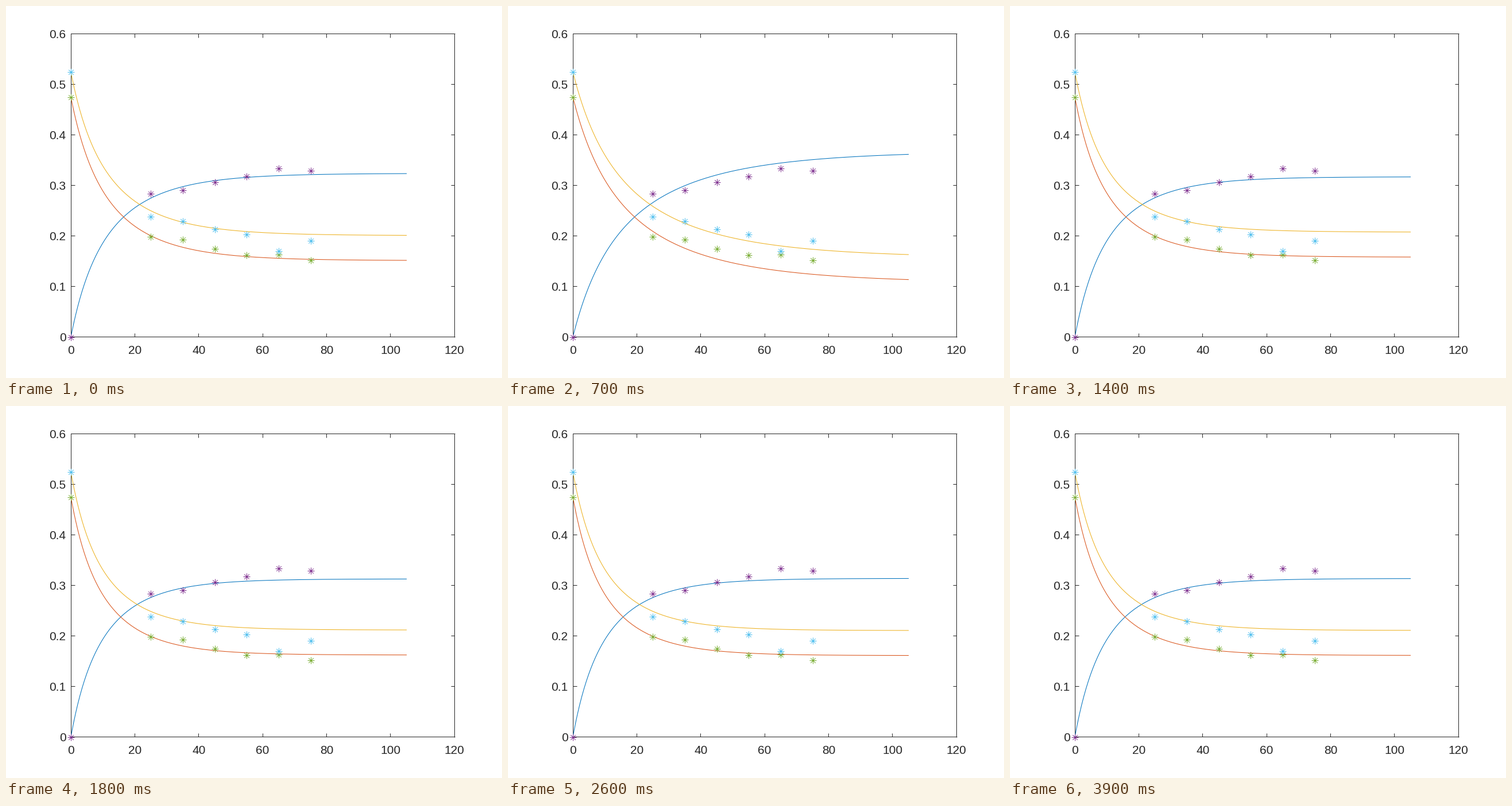
Recreate the animation shown at these times as a matplotlib script. Size 864 px wide and 648 px high, loop 4 s.

```python
import numpy as np
import matplotlib.pyplot as plt
from matplotlib.animation import FuncAnimation
from matplotlib.path import Path

W, H, DPI = 864, 648, 150
FRAMES, INTERVAL = 40, 100
LEFT, RIGHT, TOP, BOTTOM = 113, 781, 48, 576
INK = "#262626"
PX = 72 / DPI          # points per pixel
DIGIT = 11.58          # advance of one digit at 10 pt
A0, B0 = 0.475, 0.5245
HALF = A0 / 2

plt.rcParams["font.family"] = "Liberation Sans"
fig = plt.figure(figsize=(W / DPI, H / DPI), dpi=DPI, facecolor="white")
ax = fig.add_axes([0, 0, 1, 1])
ax.set(xlim=(0, W), ylim=(H, 0))
ax.axis("off")


def sx(t):
    return LEFT + np.asarray(t) * (RIGHT - LEFT) / 120


def sy(v):
    return BOTTOM + 0.5 - np.asarray(v) * (BOTTOM - TOP) / 0.6


def rule(x, y):
    ax.plot(x, y, color=INK, lw=PX, solid_capstyle="butt", snap=True, zorder=1)


def label(x, y, text):
    ax.text(x, y, text, size=10, color=INK, ha="left", va="baseline")


def draw_axes():
    for y in (TOP, BOTTOM):
        rule([LEFT, RIGHT + 1], [y, y])
    for x in (LEFT, RIGHT):
        rule([x, x], [TOP, BOTTOM + 1])
    for t in range(0, 121, 20):
        x = round(float(sx(t)) - 0.2)
        rule([x, x], [TOP, TOP + 7])
        rule([x, x], [BOTTOM - 6, BOTTOM])
        label(sx(t) - len(str(t)) * DIGIT / 2, 606, str(t))
    for i in range(7):
        y = BOTTOM - i * (BOTTOM - TOP) // 6
        rule([LEFT, LEFT + 7], [y, y])
        rule([RIGHT - 6, RIGHT], [y, y])
        label(75.5 if i else 93, y + 8, f"0.{i}" if i else "0")


def star():
    d = 0.7
    arms = [(1, 0), (0, 1), (d, d), (d, -d)]
    verts = [p for x, y in arms for p in ((-x, -y), (x, y))]
    return Path(verts, [Path.MOVETO, Path.LINETO] * 4)


def scatter(values, color):
    times = [0, 25, 35, 45, 55, 65, 75]
    ax.plot(sx(times), sy(values), ls="none", marker=star(), ms=12 * PX,
            mec=color, mfc="none", mew=PX, zorder=3)


def product(t, plateau, t_half):
    """Reversible A + B <-> C, from its equilibrium and time to A0 / 2."""
    ab = A0 * B0
    other = ab / plateau
    e_half = (ab - HALF * other) / (ab - HALF * plateau)
    e = e_half ** (t / t_half)
    return ab * (1 - e) / (other - plateau * e)


draw_axes()
time = np.linspace(0, 105, 300)
curves = [ax.plot([], [], color=c, lw=1.04 * PX, zorder=2)[0]
          for c in ("#0072BD", "#D95319", "#EDB120")]
scatter([0, 0.283, 0.290, 0.306, 0.318, 0.334, 0.3295], "#7E2F8E")
scatter([A0, 0.198, 0.1925, 0.1745, 0.162, 0.163, 0.152], "#77AC30")
scatter([B0, 0.2385, 0.2285, 0.2135, 0.2025, 0.170, 0.190], "#4DBEEE")

# Search steps of the fit: frame, equilibrium, half time
STEPS = np.array([
    (0, 0.3238, 16.5), (7, 0.3678, 19.3), (11, 0.3108, 15.4),
    (14, 0.3170, 16.0), (18, 0.3128, 15.6), (22, 0.3136, 15.7),
    (27, 0.3139, 15.72), (31, 0.3136, 15.7), (39, 0.3136, 15.7),
]).T


def update(frame):
    plateau = np.interp(frame, STEPS[0], STEPS[1])
    t_half = np.interp(frame, STEPS[0], STEPS[2])
    c = product(time, plateau, t_half)
    for line, v in zip(curves, (c, A0 - c, B0 - c)):
        line.set_data(sx(time), sy(v))
    return curves


anim = FuncAnimation(fig, update, frames=FRAMES, interval=INTERVAL,
                     repeat=True, repeat_delay=0, blit=False)
plt.show()
```
